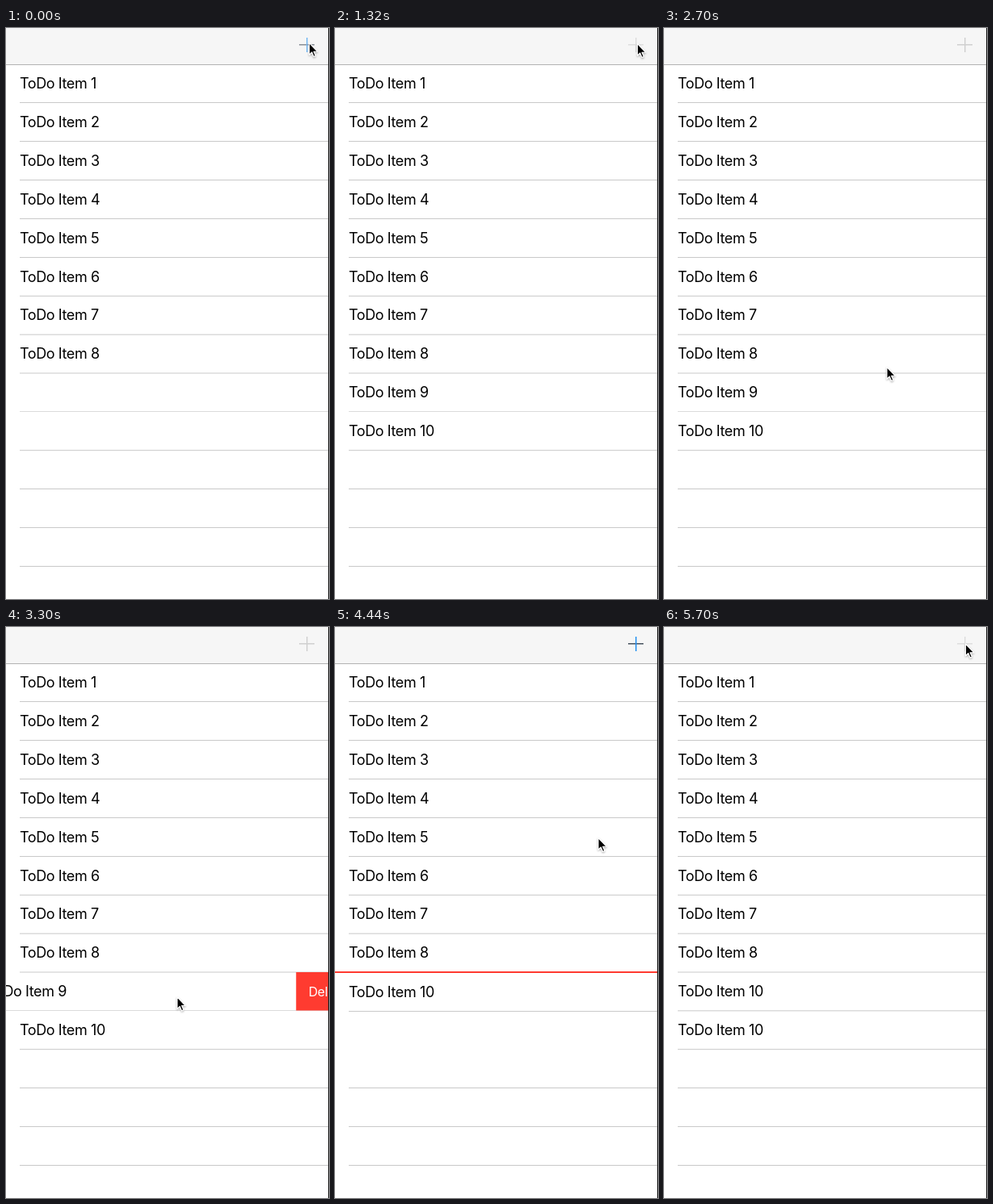
Recreate the animation shown at these times as an HTML page. Size 400x708 px, loop 5760 ms.

```html
<!DOCTYPE html>
<html lang="en">
<head>
<meta charset="utf-8">
<title>ToDo list</title>
<style>
  html, body { margin: 0; width: 100%; height: 100%; overflow: hidden; background: #fff; }
  svg { display: block; width: 400px; height: 708px; }
  text { font: 400 18px Inter, "Open Sans", sans-serif; letter-spacing: -0.4px; fill: #000; }
  .label { font-size: 15.8px; letter-spacing: -0.35px; fill: #fff; }
  .line { fill: #929292; }
</style>
</head>
<body>
<svg viewBox="0 0 400 708">
  <defs>
    <clipPath id="cell"><rect id="cellClip" y="427" width="400" height="49"/></clipPath>
    <filter id="shadow" x="-50%" y="-50%" width="200%" height="200%">
      <feDropShadow dx="0" dy="1.2" stdDeviation="1" flood-opacity=".35"/>
    </filter>
  </defs>
  <rect width="400" height="708" fill="#fff"/>
  <g id="list"></g>
  <g id="deletedRow" clip-path="url(#cell)">
    <g id="swiped"></g>
    <g id="remove">
      <rect y="428" width="400" height="47.5" fill="#ff3b30"/>
      <text class="label" x="15.5" y="458">Delete</text>
    </g>
  </g>
  <rect id="redLine" y="427" width="400" height="2" fill="#ff3b30"/>
  <rect width="400" height="45" fill="#f6f6f6"/>
  <rect y="45" width="400" height="1" fill="#b2b2b2"/>
  <g id="plus">
    <rect id="bar" x="363" y="20" width="19" height="1.5"/>
    <rect id="stem" x="372" y="12" width="1.5" height="18"/>
  </g>
  <rect x="399" width="1" height="708" fill="#1c1c1c"/>
  <path id="cursor" filter="url(#shadow)" stroke="#fff" stroke-width="1.1" stroke-linejoin="round"
    d="M0 0V14.6L3.3 11.5L5.6 17L7.9 16L5.6 10.7H10.2Z"/>
</svg>
<script>
const LOOP = 5760, STEP = 60, ROW = 47.92;
const $ = id => document.getElementById(id);

function add(parent, tag, attrs, content = "") {
  const node = document.createElementNS("http://www.w3.org/2000/svg", tag);
  for (const name in attrs) node.setAttribute(name, attrs[name]);
  node.textContent = content;
  return parent.appendChild(node);
}
const addText = (parent, row, number = row + 1) =>
  add(parent, "text", { x: 17, y: Math.floor(75.4 + ROW * row) }, "ToDo Item " + number);
const addLine = (parent, row) =>
  add(parent, "rect", { class: "line", x: 17, y: 92.31 + ROW * row, width: 800, height: 0.5 });

const list = $("list"), swiped = $("swiped"), tenth = add(list, "g", {});
for (let row = 0; row < 8; row++) {
  addText(list, row);
  addLine(list, row);
}
for (let row = 10; row < 13; row++) addLine(list, row);
const ninthText = addText(swiped, 8), tenthText = addText(tenth, 9);
addLine(swiped, 8);
addLine(tenth, 9);
const newTenthText = addText(list, 9), spareLine = addLine(list, 9);

const setOpacity = (node, value) => node.setAttribute("opacity", value);
const move = (node, x, y) => node.setAttribute("transform", `translate(${x} ${y})`);

// Smooth progress from 0 to 1 between two times.
function ease(t, from, to) {
  const p = Math.min(1, Math.max(0, (t - from) / (to - from)));
  return p * p * (3 - 2 * p);
}

// How far the button is dimmed by a press.
const press = (t, down, up) => ease(t, down, down + 120) - ease(t, up - 60, up + 60);

function cursorAt(t) {
  let x = 375.5, y = 18.5;
  const glide = (from, to, endX, endY) => {
    const p = ease(t, from, to);
    x += (endX - x) * p;
    y += (endY - y) * p;
  };
  glide(840, 1320, 374.5, 19.5);
  glide(1680, 1920, 365, 43);
  glide(1920, 2160, 373.5, 22.5);
  glide(2400, 2700, 276, 420.5);
  glide(2820, 3060, 252, 458.5);
  glide(3060, 3420, 198, 459);
  glide(3480, 3960, 370, 458);
  glide(4080, 4440, 326, 261.5);
  glide(4620, 5220, 373.5, 21);
  return [x, y];
}

function draw(t) {
  setOpacity(ninthText, ease(t, 120, 420));
  setOpacity(tenthText, ease(t, 960, 1260));
  setOpacity(newTenthText, ease(t, 5400, 5640));

  // Drag the row, snap it open, then fill it with red while it collapses.
  const offset = 55 * ease(t, 3060, 3420) + 25 * ease(t, 3540, 3720) + 320 * ease(t, 4080, 4260);
  const lift = ROW * ease(t, 4080, 4470);
  move(swiped, -offset, 0);
  move($("remove"), 400 - offset, 0);
  move(tenth, 0, -lift);
  $("cellClip").setAttribute("height", 49 - lift);
  setOpacity($("deletedRow"), t < 4440 ? 1 : 0);
  setOpacity($("redLine"), t >= 4380 && t < 4680 ? 1 : 0);
  setOpacity(spareLine, t >= 4560 ? 1 : 0);

  // Ten items are the limit: the button is grey while the list is full.
  const full = (t >= 1020 && t < 4200) || t >= 5460;
  $("bar").setAttribute("fill", full ? "#d0d0d0" : "#46525e");
  $("stem").setAttribute("fill", full ? "#d0d0d0" : "#2690f0");
  setOpacity($("plus"), 1 - 0.75 * (press(t, -540, 0) + press(t, 780, 1320) + press(t, 5280, 5700)));

  move($("cursor"), ...cursorAt(t));
}

const start = performance.now();
function tick() {
  const elapsed = (performance.now() - start) % LOOP;
  draw(Math.floor(elapsed / STEP) * STEP);
  requestAnimationFrame(tick);
}
tick();
</script>
</body>
</html>
```
